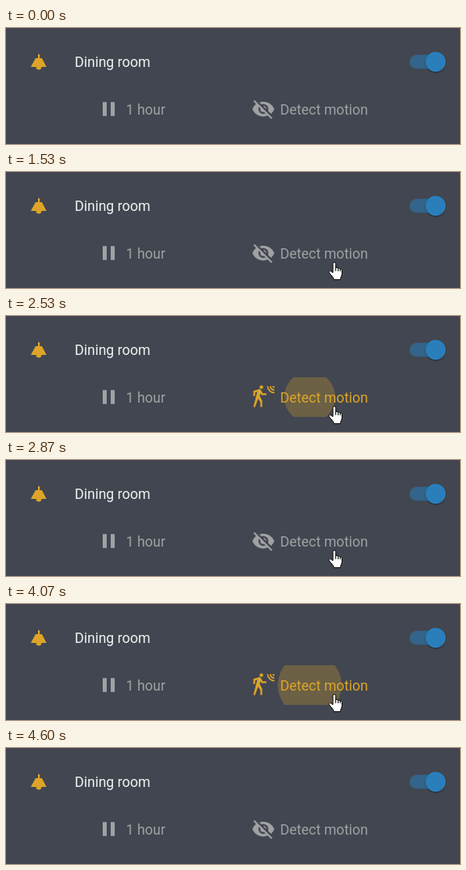
An HTML page that plays this animation: 568 by 146 pixels, repeating every 5470 ms.

```html
<!DOCTYPE html>
<html lang="en">
<head>
<meta charset="utf-8">
<title>Motion detection toggle</title>
<style>
  html, body { margin: 0; width: 100%; height: 100%; overflow: hidden; background: #424650; }
  svg { display: block; width: 568px; height: 146px; }
  text { font: 17.5px Roboto, sans-serif; }
</style>
</head>
<body>
<svg viewBox="0 0 568 146" xmlns="http://www.w3.org/2000/svg">
  <defs>
    <clipPath id="area"><rect x="297" y="77" width="166" height="50"/></clipPath>
    <filter id="shadow" x="-30%" y="-30%" width="160%" height="160%">
      <feDropShadow dx="0" dy="1.2" stdDeviation="1.3" flood-color="#000" flood-opacity=".4"/>
    </filter>
  </defs>
  <rect width="568" height="146" fill="#424650"/>

  <path fill="#dca52a" d="M40 33h2.2v5H45l5.6 11H44.400a3.400 3.400 0 0 1-6.800 0H31l6-11h3Z"/>
  <text x="86" y="48.800" fill="#f2f2f2">Dining room</text>
  <rect x="505" y="33.750" width="45" height="17.500" rx="8.750" fill="#2a7ebd" opacity=".54"/>
  <circle cx="537.500" cy="42.500" r="12.500" fill="#2a7ebb" filter="url(#shadow)"/>

  <path fill="#a0a1a3" d="M121 93.300h5v17.500h-5ZM131 93.300h5v17.500h-5Z"/>
  <text x="150" y="108.800" fill="#a0a1a3">1 hour</text>

  <g clip-path="url(#area)"><circle id="ripple" cx="380" cy="102" r="0"/></g>
  <g id="action">
    <g transform="translate(307 87) scale(1.25)">
      <path id="eye" d="M11.83,9L15,12.16C15,12.11 15,12.05 15,12A3,3 0 0,0 12,9C11.94,9 11.89,9 11.83,9M7.53,9.8L9.08,11.35C9.03,11.56 9,11.77 9,12A3,3 0 0,0 12,15C12.22,15 12.44,14.97 12.65,14.92L14.2,16.47C13.53,16.8 12.79,17 12,17A5,5 0 0,1 7,12C7,11.21 7.2,10.47 7.53,9.8M2,4.27L4.73,7C3.08,8.3 1.78,10 1,12C2.73,16.39 7,19.5 12,19.5C13.55,19.5 15.03,19.2 16.38,18.66L19.73,22L21,20.73L3.27,3M12,7A5,5 0 0,1 17,12C17,12.64 16.87,13.26 16.64,13.82L19.57,16.75C21.07,15.5 22.27,13.86 23,12C21.27,7.61 17,4.5 12,4.5C10.6,4.5 9.26,4.75 8,5.2L10.17,7.35C10.74,7.13 11.35,7 12,7Z"/>
      <g id="walker">
        <circle cx="10" cy="2" r="1.8"/>
        <path d="M15.67,1A7.33,7.33 0 0,0 23,8.33V7A6,6 0 0,1 17,1ZM18.33,1C18.33,3.58 20.42,5.67 23,5.67V4.33C21.16,4.33 19.67,2.84 19.67,1ZM21,1A2,2 0 0,0 23,3V1ZM7.92,4.03C7.75,4.03 7.58,4.06 7.42,4.11L2,5.8V11H3.8V7.33L5.91,6.67L2,22H3.8L6.67,13.89L9,17V22H10.8V15.59L8.31,11.05L9.04,8.18L10.12,10H15V8.2H11.38L9.38,4.87C9.08,4.37 8.54,4.03 7.92,4.03Z"/>
      </g>
    </g>
    <text x="343" y="108.800">Detect motion</text>
  </g>

  <g id="hand" stroke="#000" stroke-linejoin="round" stroke-linecap="round">
    <path fill="#fff" d="M5.500 13V2.200a1.800 1.800 0 0 1 3.600 0V7.600a1.600 1.600 0 0 1 2.900.6a1.600 1.600 0 0 1 2.600.8a1.500 1.500 0 0 1 2.200 1.400V15c0 2-1.800 4-1.800 7.200H6.800C6.800 19.500 2.500 16 .8 13.200c-.8-1.600 1-2.600 2.200-1.600Z"/>
    <path fill="none" d="M9.100 7.600v3.400M12 8.200v3M14.600 9v2.400"/>
  </g>
</svg>
<script>
  const LOOP = 5470, TICK = 200 / 3;
  const GREY = '#a0a1a3', GOLD = '#dca52a';
  const $ = id => document.getElementById(id);
  const ripple = $('ripple'), action = $('action'), eye = $('eye'), walker = $('walker'), hand = $('hand');

  const clamp = x => Math.max(0, Math.min(1, x));
  const span = (k, a, b) => clamp((k - a) / (b - a));
  const smooth = x => x * x * (3 - 2 * x);
  const show = (el, on) => el.setAttribute('visibility', on ? 'visible' : 'hidden');

  // Each click: start tick, whether it switches detection on, ticks until it is gone.
  const clicks = [[27, true, 8], [36, false, 7], [49, true, 8], [58, false, 8]];

  function rippleAt(n, on, end) {
    if (on) return { r: 32 + 30 * n, a: 0.21 * (1 - span(n, 3, end)) };
    const r = n <= 3 ? 16 + 8 * n : 40 + 27 * (n - 3);
    return { r, a: 0.27 * Math.min((n + 1) / 3, 1 - span(n, 4, end)) };
  }

  function handAt(k) {
    const enter = 1 - smooth(span(k, 10.5, 15));
    const move = smooth(span(k, 17, 23));
    const leave = span(k, 66, 69);
    return [409.5 + 11 * enter - 6 * move, 121.3 + 25 * enter - 8 * move + 34 * leave];
  }

  function draw(ms) {
    const k = Math.floor((ms % LOOP + 5) / TICK);
    let active = false, wave = { r: 0, a: 0 }, color = GREY;
    for (const [start, on, end] of clicks) {
      const n = k - start;
      if (n < 0) break;
      if (n >= (on ? 2 : 5)) active = on;
      wave = n < end ? rippleAt(n, on, end) : { r: 0, a: 0 };
      color = on ? GREY : GOLD;
    }
    ripple.setAttribute('r', wave.r);
    ripple.setAttribute('fill', color);
    ripple.setAttribute('opacity', wave.a);
    action.setAttribute('fill', active ? GOLD : GREY);
    show(eye, !active);
    show(walker, active);
    hand.setAttribute('transform', `translate(${handAt(k)})`);
    show(hand, k >= 11 && k < 69);
  }

  const begin = performance.now();
  function loop(now) {
    draw(Math.max(0, now - begin));
    requestAnimationFrame(loop);
  }
  draw(0);
  requestAnimationFrame(loop);
</script>
</body>
</html>
```
